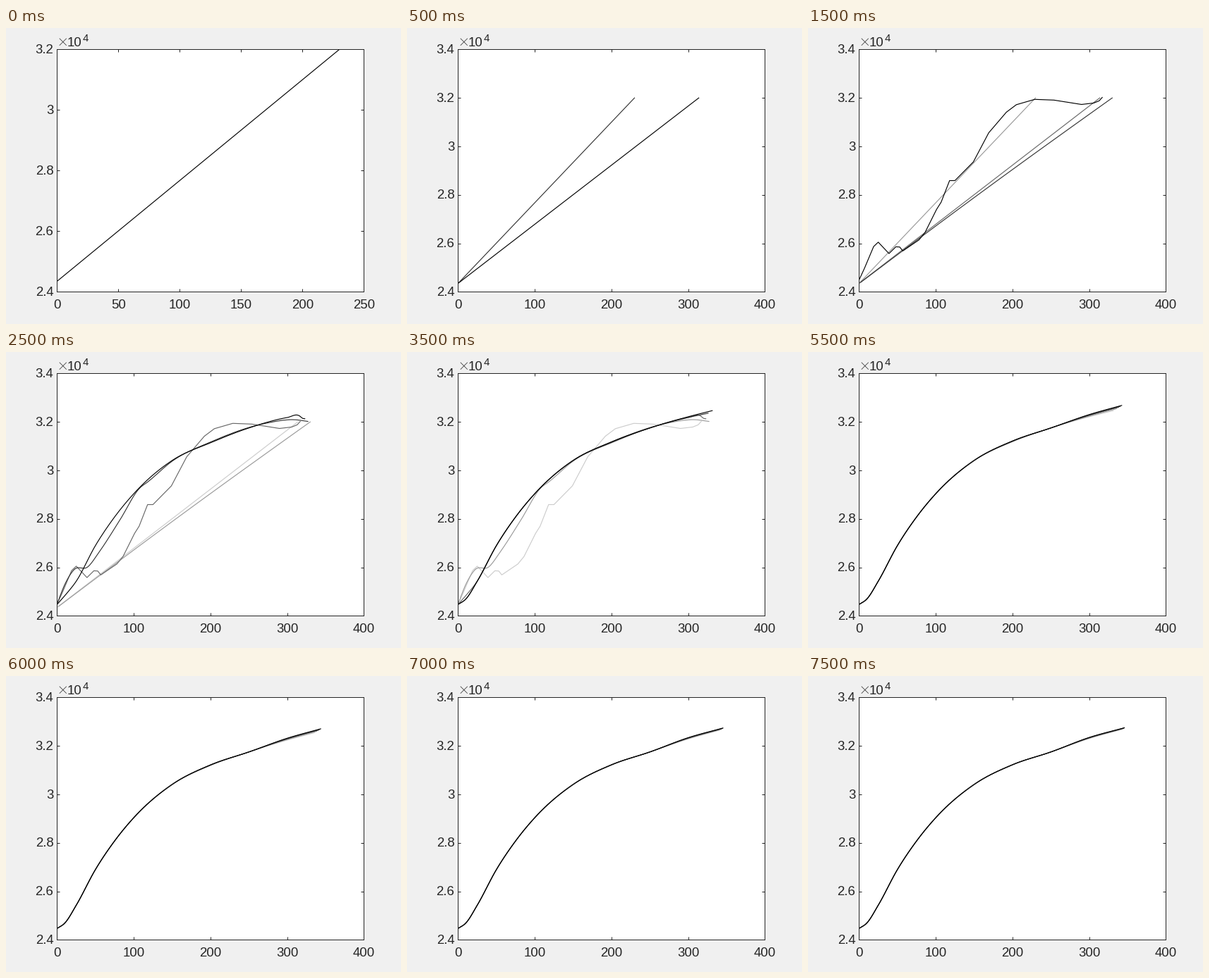
These frames come from a looping animation (560 by 420 pixels, 8000 ms). A matplotlib script:

```python
import numpy as np
import matplotlib.pyplot as plt
from matplotlib.animation import FuncAnimation

W, H, DPI = 560, 420, 100
# Just under the half pixel, so that snapping does not push the box over.
LEFT, RIGHT, TOP, BOTTOM = 72.4, 507.4, 30.4, 374.4
INK = "#262626"
PX = 72 / DPI
FONT = 18.67 * PX
TRAIL = 5
SETTLED = 10
plt.rcParams["font.family"] = "Liberation Sans"

# Key points, heights in hundreds.
WAVY = [
    (0, 244.9), (7, 249.7), (19, 258.7), (25, 260.5), (39, 255.8),
    (48, 258.6), (53, 258.5), (57, 256.9), (78, 261.4), (86, 264.5),
    (101, 274), (107, 277), (118, 285.9), (125, 285.9), (149, 293.6),
    (169, 305.6), (192, 314.1), (205, 317.2), (229, 319.4), (254, 319.1),
    (290, 317.3), (306, 317.9), (313, 318.8), (317, 320.2),
]
STEPPED = [
    (0, 244.9), (10, 252.9), (22, 259), (40, 260.2), (55, 266.4),
    (82, 279.6), (108, 292.8), (118, 295.2), (150, 303.8), (200, 311.7),
    (273, 319.5), (310, 320.9), (327, 320.2),
]


def line(x0, y0, x1, y1, bow=0):
    t = np.linspace(0, 1, 40)
    return x0 + (x1 - x0) * t, y0 + (y1 - y0) * t + bow * np.sin(np.pi * t)


def polyline(points):
    x, y = np.array(points, float).T
    return x, y * 100


def smooth(points, n=12):
    """Cubic Hermite curve through the points."""
    x, y = polyline(points)
    m = np.gradient(y, x)
    h = np.diff(x)[:, None]
    t = np.linspace(0, 1, n, endpoint=False)
    a, b = y[:-1, None], y[1:, None]
    c, d = m[:-1, None] * h, m[1:, None] * h
    ys = (a * (1 + 2 * t) * (1 - t) ** 2 + c * t * (1 - t) ** 2
          + b * t * t * (3 - 2 * t) + d * t * t * (t - 1))
    xs = x[:-1, None] + h * t
    return np.append(xs, x[-1]), np.append(ys, y[-1])


def climb(foot, shoulder, tail):
    """The common rise, with its heights at x = 10 and x = 200 left open."""
    return smooth([(0, 244.7), (10, foot), (25, 254.3), (50, 269),
                   (75, 280.8), (100, 290.4), (150, 304.1),
                   (200, shoulder), (250, 317.5), *tail])


def settled(i):
    """Each pass closes part of the gap to the final curve."""
    gap = 0.75 ** i
    tail = [(300, 324 - 2.2 * 0.85 ** i), (347.5 - 21.5 * gap, 327.8 - 4.2 * gap)]
    return climb(246.9, 312.3 - 0.7 * gap, tail)


curves = [line(0, 24350, 230, 32000),
          line(0, 24350, 313.8, 32000),
          line(2, 24390, 330, 32000, bow=65),
          polyline(WAVY),
          smooth(STEPPED),
          climb(248.3, 311.4, [(300, 321.8), (316, 322.5),
                               (320, 321.5), (323, 321.3)])]
curves += [settled(i) for i in range(SETTLED)]

fig = plt.figure(figsize=(W / DPI, H / DPI), dpi=DPI, facecolor="#f0f0f0")
page = fig.add_axes([0, 0, 1, 1], zorder=2)
ax = fig.add_axes([LEFT / W, 1 - BOTTOM / H,
                   (RIGHT - LEFT) / W, (BOTTOM - TOP) / H], zorder=1)


def label(x, y, s, ha="center", size=FONT):
    page.text(x, y, s, ha=ha, va="baseline", size=size, color=INK)


def draw_labels(xmax, xstep, ymax):
    page.clear()
    page.set(xlim=(0, W), ylim=(H, 0))
    page.axis("off")
    for v in range(0, xmax + 1, xstep):
        label(LEFT + (RIGHT - LEFT) * v / xmax, 398, str(v))
    for v in range(24, ymax + 1, 2):
        y = BOTTOM - (BOTTOM - TOP) * (v - 24) / (ymax - 24)
        label(67.5, y + 5.7, f"{v / 10:g}", ha="right")
    for ys in ((15, 24.5), (24.5, 15)):
        page.plot((76, 85.5), ys, color=INK, lw=0.7 * PX)
    label(87, 26, "10", ha="left")
    label(108.5, 19, "4", ha="left", size=FONT * 0.8)


def update(k):
    xmax, xstep, ymax = (250, 50, 32) if k == 0 else (400, 100, 34)
    draw_labels(xmax, xstep, ymax)
    ax.clear()
    ax.set(xlim=(0, xmax), ylim=(24000, ymax * 1000),
           xticks=range(0, xmax + 1, xstep),
           yticks=range(24000, ymax * 1000 + 1, 2000))
    ax.tick_params(direction="in", top=True, right=True, length=4.4 * PX,
                   width=PX, color=INK, labelbottom=False, labelleft=False)
    for spine in ax.spines.values():
        spine.set(color=INK, linewidth=PX)
    for j in range(max(0, k - TRAIL + 1), k + 1):
        ax.plot(*curves[j], color=str((k - j) / TRAIL), lw=1.15 * PX)
    return []


anim = FuncAnimation(fig, update, frames=len(curves), interval=500,
                     init_func=lambda: update(0), repeat=True, repeat_delay=0)
plt.show()
```
